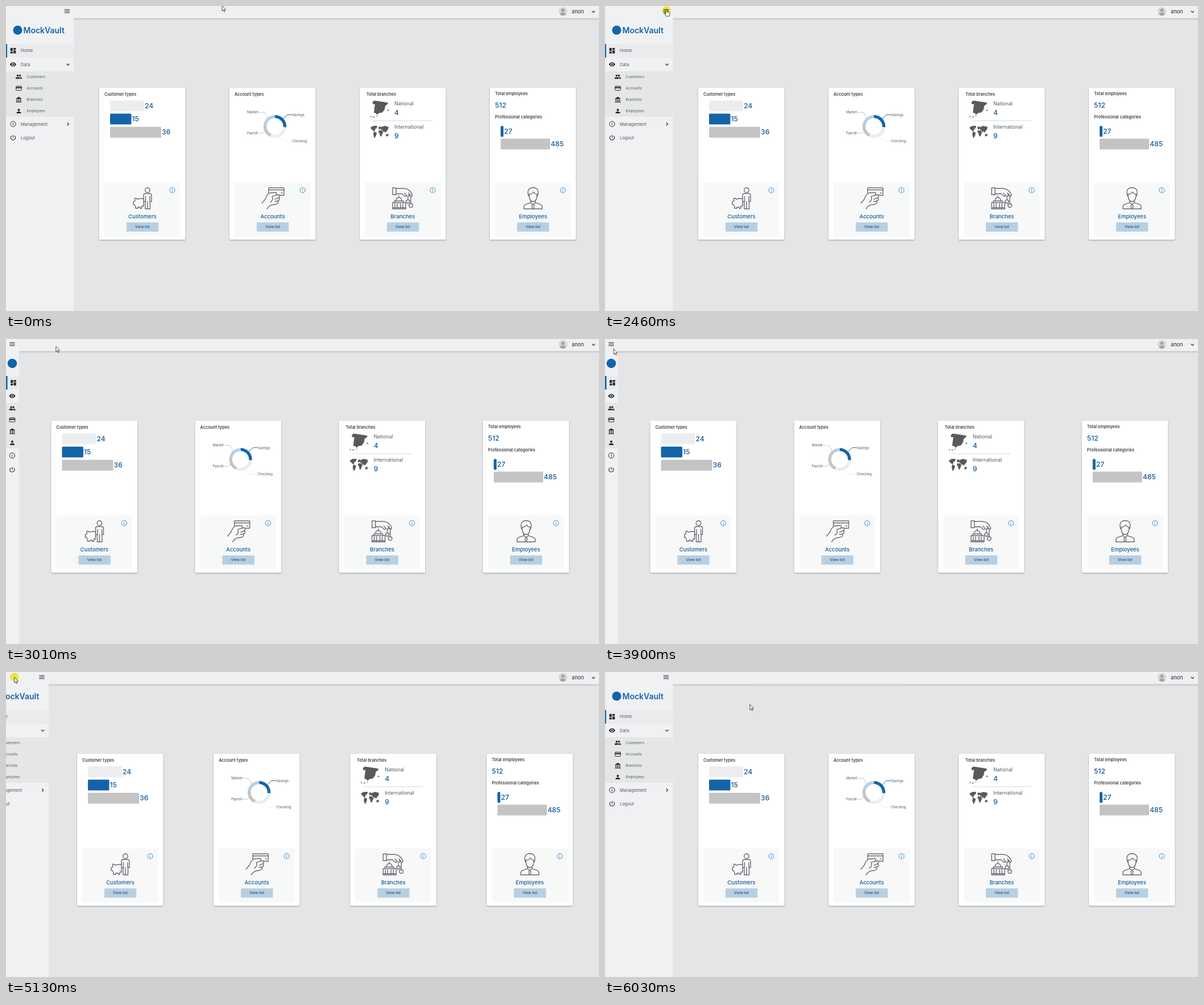
An HTML page for the animation above (6630 ms loop, 1043x537 px).

```html
<!DOCTYPE html>
<html lang="en">
<head>
<meta charset="utf-8">
<title>Bank dashboard</title>
<style>
html, body { margin: 0; width: 100%; height: 100%; overflow: hidden; background: #e4e5e7; }
svg { display: block; width: 100vw; height: 100vh; font-family: Inter, "Open Sans", sans-serif; }
.card { filter: drop-shadow(0 1px 1px #0005); }
.line { fill: none; stroke: #686b73; stroke-width: 1.4; stroke-linejoin: round; stroke-linecap: round; }
#glow { mix-blend-mode: multiply; }
</style>
</head>
<body>
<svg id="stage" viewBox="0 0 1043 537"></svg>
<script>
const BLUE = '#1464a9', NAVY = '#155a98', DARK = '#26282c', INK = '#55585e';
const GREY = '#c4c4c4', PALE = '#ecedee', SKY = '#b7cfe2';
const FULL = 119.5, MINI = 23;

const rect = (x, y, w, h, fill, r = 0) =>
  `<rect x="${x}" y="${y}" width="${w}" height="${h}" fill="${fill}" rx="${r}"/>`;
const dot = (x, y, r, fill) => `<circle cx="${x}" cy="${y}" r="${r}" fill="${fill}"/>`;
const fill = (d, color = DARK) => `<path d="${d}" fill="${color}"/>`;
const stroke = (d, color, w = 1) => `<path d="${d}" fill="none" stroke="${color}" stroke-width="${w}"/>`;
const group = (x, y, body) => `<g transform="translate(${x} ${y})">${body}</g>`;
// Text is placed by the middle of its capitals
const text = (x, y, s, size, color = DARK, weight = 400, anchor = 'start') =>
  `<text x="${x}" y="${y + size * .36}" font-size="${size}" fill="${color}" font-weight="${weight}" text-anchor="${anchor}">${s}</text>`;
const label = (x, y, s) => text(x, y, s, 7.4, DARK, 500);
const number = (x, y, s) => text(x, y, s, 12.2, NAVY, 500);
const info = (x, y, color, r = 4.6) =>
  group(x, y, `<circle r="${r}" fill="none" stroke="${color}"/>` + stroke('M0-.7V2.4M0-2.6V-1.5', color));

// Menu icons, each centred on its origin
const icons = {
  home: rect(-4.8, -4.8, 4.2, 5.2, DARK) + rect(-4.8, 1.5, 4.2, 3.3, DARK) +
        rect(.6, -4.8, 4.2, 3.3, DARK) + rect(.6, -.4, 4.2, 5.2, DARK),
  eye: fill('M-5.6 0Q-3.2-3.8 0-3.8T5.6 0Q3.2 3.8 0 3.8T-5.6 0z') + dot(0, 0, 2.5, '#f0f1f3') + dot(0, 0, 1.5, DARK),
  people: dot(-2, -2, 1.8, DARK) + dot(2, -2, 1.8, DARK) +
          fill('M-5.6 3.6V2Q-5 .6-2 .6T1.6 2V3.6zM2.3 3.6V2L1.7.7Q5.2.8 5.6 2V3.6z'),
  card: `<rect x="-4.8" y="-3.6" width="9.6" height="7.4" rx="1" fill="none" stroke="${DARK}"/>` +
        rect(-5, -2, 10, 2.2, DARK),
  bank: fill('M-5-1.9L0-5 5-1.9V-1H-5zM-4-.2h1.6v3.3H-4zM-.8-.2H.8v3.3H-.8zM2.4-.2H4v3.3H2.4zM-5 3.6H5V5H-5z'),
  person: dot(0, -2, 2, DARK) + fill('M-4 4V2.6Q-3 .8 0 .8T4 2.6V4z'),
  info: info(0, 0, DARK, 4.7),
  power: stroke('M-2.7-3.2A4.2 4.2 0 1 0 2.7-3.2M0-4.8V.2', DARK, 1.1)
};
const icon = (name, x, y) => group(x, y, icons[name]);
const chevron = (x, y, turn = 0) =>
  `<path transform="translate(${x} ${y}) rotate(${turn})" d="M-2.6-1.3L0 1.3 2.6-1.3" fill="none" stroke="${DARK}" stroke-width="1.2"/>`;

function fullMenu() {
  const main = [['home', 'Home', 78.7], ['eye', 'Data', 102.8], ['info', 'Management', 207.8], ['power', 'Logout', 231.8]];
  const sub = [['people', 'Customers'], ['card', 'Accounts'], ['bank', 'Branches'], ['person', 'Employees']];
  return rect(0, 0, FULL, 537, '#f0f1f3') + rect(0, 67, FULL, 24, '#e9ebed') + rect(0, 67, 2, 24, BLUE) +
    rect(0, 115, FULL, 80, '#e5e7e7') +
    dot(20.5, 42.5, 8, BLUE) + text(30.5, 43, 'MockVault', 14, BLUE, 600) +
    stroke('M102.8 6.2h9.4M102.8 9h9.4M102.8 11.8h9.4', DARK, 1.1) +
    main.map(([i, s, y]) => icon(i, 12.5, y) + text(26, y, s, 7.6, INK)).join('') +
    sub.map(([i, s], n) => icon(i, 22.5, 124.6 + n * 20.1) + text(36.5, 124.6 + n * 20.1, s, 6.35, INK)).join('') +
    chevron(109, 103) + chevron(109, 208, -90);
}

function miniMenu() {
  const rows = [['eye', 100.3], ['people', 122], ['card', 142.3], ['bank', 162.3], ['person', 182.7], ['info', 205.2], ['power', 230]];
  return rect(0, 22, MINI, 515, '#f0f1f3') + rect(0, 65, MINI, 24, '#e9ebed') + rect(0, 65, 2.6, 24, BLUE) +
    rect(0, 112, MINI, 81, '#e5e7e7') + dot(11, 43, 8.3, BLUE) + icon('home', 13, 77) +
    rows.map(([i, y]) => icon(i, 11, y)).join('');
}

const bar = (y, w, color, value) => rect(19, y, w, 19, color, 1.5) + number(20 + w, y + 9.2, value);
const arc = (from, to, color) =>
  `<circle r="17.4" fill="none" stroke="${color}" stroke-width="5.4" pathLength="360"
    stroke-dasharray="${to - from} 360" transform="rotate(${from - 90})"/>`;

const customers = label(9, 155.6, 'Customer types') +
  bar(166.2, 60, PALE, 24) + bar(189.4, 37.5, BLUE, 15) + bar(212.7, 90, GREY, 36);

const accounts = label(9, 155.6, 'Account types') +
  group(80, 212, arc(0, 95, BLUE) + arc(95, 205, PALE) + arc(205, 285, GREY) + arc(285, 360, SKY)) +
  stroke('M94 199L102 191.3H110', BLUE) + stroke('M67 198L62 187.3H51', SKY) +
  stroke('M64 219L58 224H50', GREY) + stroke('M90 231L96 238H109', PALE) +
  [[110, 191.5, 'Savings'], [110, 238, 'Checking'], [31, 187, 'Market'], [31, 224, 'Payroll']]
    .map(([x, y, s]) => text(x, y, s, 5.9, INK)).join('');

const branches = label(11.7, 155.6, 'Total branches') +
  fill('M22.5 169l3.5-2.5 7 1 16 2.5 1 2-5 4-1 6-4 5.5-6 1-3 3-3-3-3-.5 1-8 1-7-4-.5z' +
    'M48 184l2-1.5 2 1-2 1.5zM19 194h2v1.5h-2zM23 195.5l3-1 1 1-3 1zM29 194l2-1.5v2z' +
    'M19 214l5-3h7l-1 4-3 2-1 4-3-2-3-3zM25 221l5 2-1 5-3 5-2-7zM33 213l4-1 1 3-4 3zM34 219h5l2 4-3 7-2-1-1-5-2-2z' +
    'M38 213l6-2 7 2-1 4-3 4-2 2-2-3-1 3-2-4-3-2zM46 226l4-1 1 3-4 2z', '#5a5a5c') +
  text(61, 171.5, 'National', 8.75, INK) + number(61, 188, 4) +
  stroke('M24 202H127.5', '#d5d6d8') +
  text(61, 212.5, 'International', 8.75, INK) + number(61, 229, 9);

const employees = label(9, 154.6, 'Total employees') + number(9, 175, 512) +
  label(9, 195.5, 'Professional categories') + bar(211.2, 5, BLUE, 27) + bar(233.6, 87, GREY, 485);

// Closed circle as a path piece
const ring = (x, y, r) => `M${x + r} ${y}a${r} ${r} 0 1 1 ${-2 * r} 0a${r} ${r} 0 1 1 ${2 * r} 0`;

const saver = ring(9, -14, 4.3) +
  'M5-8h8q3 0 3 3v11h-2.5v13h-8.500V6h-3v-11q0-3 3-3zM9 6v13M5.500-3v9M13-3v9'.replaceAll('500', '5') +
  'M-13 5q-1-4 0-5 3 0 4 2 5-2 11-1v13h-3v4h-3v-2h-4v2h-4v-4q-2-1-2-3h-2v-5z';
const payer = 'M-7-9V-18H20V-5H12M-7-14.5H20M15-9h2' +
  'M-19 9L-13 2Q-10-7-5-9L6-10Q9-7 5-5L-1-3Q2 3-4 7M5-5L11-6Q14-2 9 0L4 2' +
  'M11-1Q14 3 9 5L4 6M9 5Q11 9 5 11L-2 12Q-7 14-10 19';
const office = 'M-18-18h6v12h-6zM-12-17H3Q13-16 17-5L15-3 10-9M-12-8Q-7-7-2-8L4-3 7-4 3-9M10-9L12-4 9-4' +
  'M-12 5q0-6 5-6t5 6zM-7-1v-3M-15 5h16v3h-16zM-18 8h23v11h-23zM-14 10v7M-10 10v7M-4 10v7M0 10v7M-18 17h23' +
  'M9-3V3M14-3V10' + ring(9, 6, 3) + ring(14, 13, 3.3);
const clerk = 'M-8-4Q-12-18 0-18.500 12-18 8-4M-7-7q0 13 7 13t7-13q-4 0-6-4-3 4-8 4z'.replace('500', '5') +
  'M-4 5v3l-8 2.5q-4 1.500-4 5v3.500h32v-3.500q0-3.500-4-5l-8-2.500v-3'.replaceAll('500', '5') +
  'M-4 8L0 11 4 8M0 11l-2 2 1 6M0 11l2 2-1 6';

const card = (title, body, art) => `<g class="card">${rect(0, 144, 151.5, 267.5, '#fff', 1.5)}</g>` + body +
  rect(9, 310.5, 133.5, 95, '#f7f8f8') + info(128.5, 324.3, '#3f8ac8') +
  group(76, 338.3, `<path class="line" d="${art}"/>`) +
  text(76, 370.3, title, 9.5, NAVY, 500, 'middle') +
  rect(48, 381, 56.3, 16.3, SKY, 1) + text(76, 389, 'View list', 6.5, '#14568f', 500, 'middle');

const cards = [['Customers', customers, saver], ['Accounts', accounts, payer],
  ['Branches', branches, office], ['Employees', employees, clerk]];

const stage = document.getElementById('stage');
stage.innerHTML = `
  <defs><linearGradient id="fade" x2="0" y2="1"><stop stop-color="#b9bbbd"/><stop offset="1" stop-color="#e4e5e7"/></linearGradient>
  <clipPath id="user"><circle cx="979.5" cy="9.5" r="7.5"/></clipPath></defs>` +
  rect(0, 0, 1043, 537, '#e4e5e7') + rect(0, 21, 1043, 4, 'url(#fade)') + rect(0, 0, 1043, 21.5, '#eff0f2') +
  `<g clip-path="url(#user)">${rect(971, 1, 17, 17, '#d6d6d7') + dot(979.5, 7.5, 3, '#a3a3a5')}
   <ellipse cx="979.5" cy="16" rx="5.5" ry="4.5" fill="#a3a3a5"/></g>` +
  text(995, 9.8, 'anon', 9.2, DARK) + chevron(1033.3, 10) +
  cards.map(c => `<g class="slot">${card(...c)}</g>`).join('') +
  `<g id="full">${fullMenu()}</g><g id="mini">${miniMenu()}</g>
  <circle id="glow" r="7.5" fill="#fbf43a"/>
  <path id="arrow" d="M0 0V9.5L2.2 7.5 3.7 11 5.2 10.3 3.7 7H6.7z" fill="#fff" stroke="#222" stroke-width=".8"/>
  <path id="hand" d="M-1 1Q0-.6 1 1V5L4.5 5.7Q6 6 6 7.5V9.5L4.8 12.5H-.5L-3.2 8.5Q-3.5 7-2 7.4L-1 8.3z" fill="#fff" stroke="#222" stroke-width=".8"/>`;

const [full, mini, glow, arrow, hand] = ['full', 'mini', 'glow', 'arrow', 'hand'].map(id => document.getElementById(id));
const slots = [...document.querySelectorAll('.slot')];

// Pointer path: time, x, y
const path = [[0, 380, -.5], [70, 379, 0], [680, 174, 31.5], [850, 150, 58], [1030, 134.5, 48], [1380, 116.5, 30],
  [1800, 108, 5.5], [2650, 108, 5.5], [3010, 88, 13], [3070, 80, 15], [3450, 46, 31], [3780, 17, 21], [4180, 11.3, 9],
  [5060, 11.3, 9], [5340, 25, 10.5], [5540, 120, 35], [6030, 254.8, 57], [6630, 254.8, 57]];

const between = (t, a, b) => t >= a && t < b;
const clamp = v => Math.min(1, Math.max(0, v));
const ease = (t, start) => 1 - (1 - clamp((t - start) / 400)) ** 3;
const move = (node, x, y) => node.setAttribute('transform', `translate(${x} ${y})`);
const show = (node, on) => { node.style.display = on ? '' : 'none'; };

function pointer(t) {
  const i = path.findIndex(p => p[0] > t), [t0, x0, y0] = path[i - 1], [t1, x1, y1] = path[i];
  const k = (t - t0) / (t1 - t0);
  return [x0 + (x1 - x0) * k, y0 + (y1 - y0) * k];
}

// Strength of the click highlight
const flash = (t, start) => t < start ? 0 : clamp((start + 330 - t) / 130);

function draw(t) {
  const closed = ease(t, 2550) - ease(t, 5040);
  const [x, y] = pointer(t);
  slots.forEach((s, i) => move(s, 164 - 84.5 * closed + i * (229 + 24.1 * closed), 0));
  move(full, (MINI - FULL) * closed, 0);
  show(mini, closed > .6);

  move(glow, x, t < 4000 ? 8 : 9);
  glow.style.opacity = flash(t, 2460) + flash(t, 4930);

  const pointing = between(t, 1590, 2700) || between(t, 3990, 5130);
  show(hand, pointing);
  show(arrow, !pointing);
  move(pointing ? hand : arrow, x, y);
}

function frame(now) {
  draw(now % 6630);
  requestAnimationFrame(frame);
}
draw(0);
requestAnimationFrame(frame);
</script>
</body>
</html>
```
